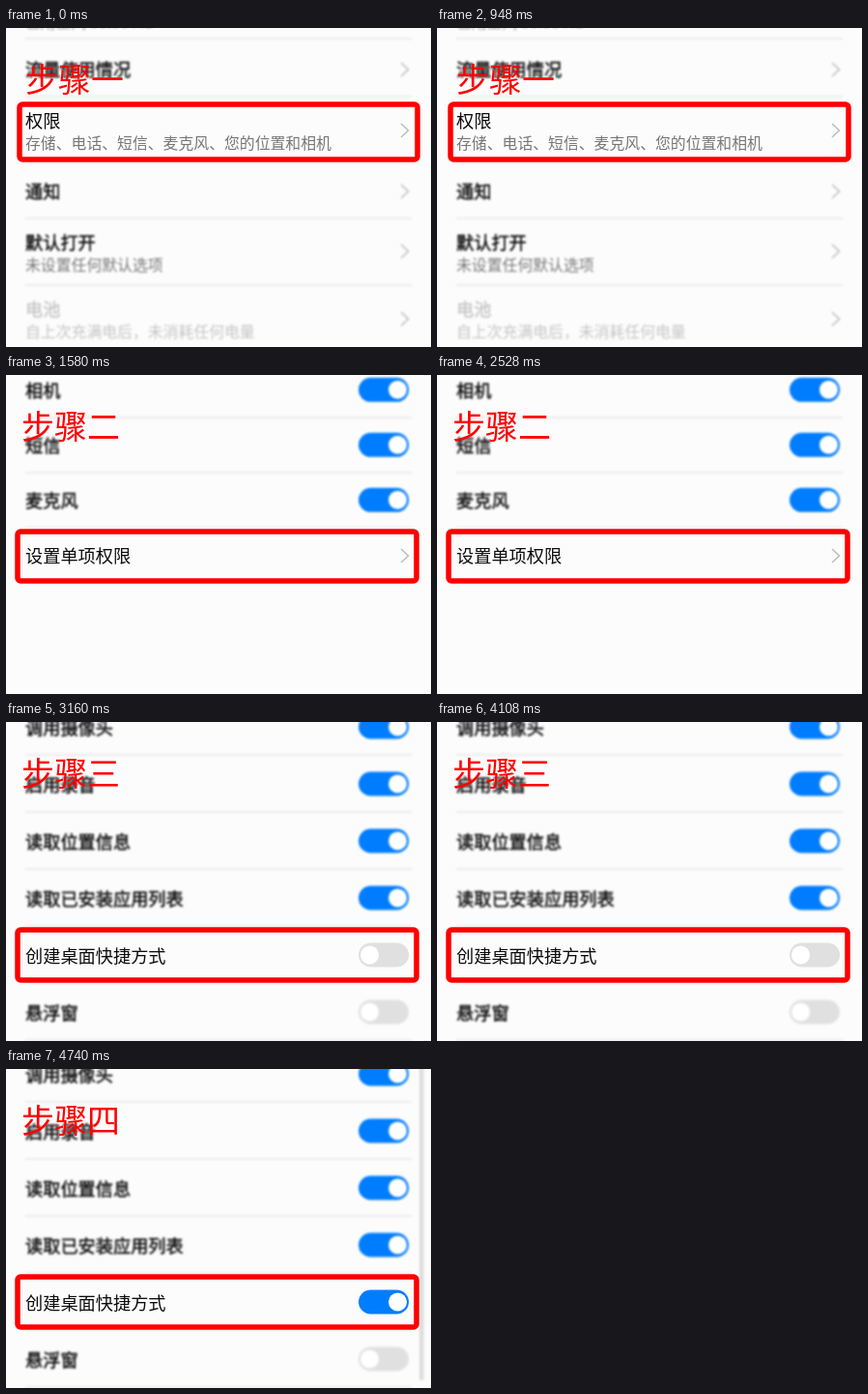
Write an HTML page that moves like this. It is 440 px wide and 330 px high and loops after 6320 ms.

```html
<!DOCTYPE html>
<html lang="zh-CN">
<head>
<meta charset="utf-8">
<title>权限设置步骤</title>
<style>
html, body { margin: 0; width: 100%; height: 100%; overflow: hidden; background: #fcfcfc; }
svg { display: block; width: 440px; height: 330px; }
text { font-family: "Noto Sans CJK SC", "Noto Sans CJK", "Noto Sans SC", sans-serif; }
.soft { filter: url(#blur); }
.soft .label { stroke: currentColor; stroke-width: .45; }
</style>
</head>
<body>
<svg id="stage" viewBox="0 0 440 330" lang="zh-CN">
  <defs>
    <filter id="blur" filterUnits="userSpaceOnUse" x="-20" y="-40" width="480" height="410" color-interpolation-filters="sRGB">
      <feGaussianBlur stdDeviation="0.9"/>
    </filter>
  </defs>
</svg>
<script>
const STEP = 1580;
const LABEL = 18.2, NOTE = 15.85, TITLE = 34;
const INK = '#0c0c0c', GREY = '#777', PALE = '#c4c4c4';
const stage = document.getElementById('stage');

function add(parent, tag, attrs, content) {
  const el = document.createElementNS('http://www.w3.org/2000/svg', tag);
  for (const key in attrs) el.setAttribute(key, attrs[key]);
  if (content) el.textContent = content;
  parent.appendChild(el);
  return el;
}

// Places text by the vertical middle of its glyphs.
function write(parent, content, x, mid, size, color, kind = '') {
  add(parent, 'text', {
    x, y: mid + size * 0.38, 'font-size': size, fill: color, color, class: kind
  }, content);
}

const label = (g, s, y, color = INK) => write(g, s, 20, y, LABEL, color, 'label');
const note = (g, s, y, color = GREY) => write(g, s, 20, y, NOTE, color);

function rule(g, y) {
  add(g, 'rect', { x: 20, y: y - 0.5, width: 400, height: 1, fill: '#dedede' });
}

function chevron(g, y) {
  add(g, 'path', {
    d: `M409 ${y - 7}l7.5 7l-7.5 7`, fill: 'none', stroke: '#bdbdbd', 'stroke-width': 1.5
  });
}

function toggle(g, y, on) {
  add(g, 'rect', {
    x: 365, y: y - 12.5, width: 52, height: 25, rx: 12.5, fill: on ? '#007dff' : '#e0e0e0'
  });
  add(g, 'circle', { cx: on ? 405.5 : 376.5, cy: y, r: 9.5, fill: '#fff' });
}

function scene(title, titleX, box, draw) {
  const g = add(stage, 'g', { visibility: 'hidden' });
  const soft = add(g, 'g', { class: 'soft' });
  const sharp = add(g, 'g', {});
  draw(soft, sharp);
  const [x, y, width, height] = box;
  add(g, 'rect', {
    x, y, width, height, rx: 3, fill: 'none', stroke: '#f00', 'stroke-width': 5.5
  });
  write(g, title, titleX, 53, TITLE, '#f00');
  return g;
}

function appInfo(soft, sharp) {
  note(soft, '已用空间 38.56 MB', -6, '#999');
  [11, 71, 197, 266].forEach(y => rule(soft, y));
  label(soft, '流量使用情况', 43);
  label(soft, '通知', 169);
  label(soft, '默认打开', 222);
  note(soft, '未设置任何默认选项', 245);
  label(soft, '电池', 291, PALE);
  note(soft, '自上次充满电后，未消耗任何电量', 314, PALE);
  [43, 169, 231, 301].forEach(y => chevron(soft, y));
  label(sharp, '权限', 96);
  note(sharp, '存储、电话、短信、麦克风、您的位置和相机', 119);
  chevron(sharp, 106);
}

function permissions(soft, sharp) {
  ['相机', '短信', '麦克风'].forEach((name, i) => {
    const y = 16 + 57 * i;
    label(soft, name, y);
    toggle(soft, y - 0.7, true);
    rule(soft, y + 28);
  });
  label(sharp, '设置单项权限', 187);
  chevron(sharp, 187);
}

const singles = granted => (soft, sharp) => {
  const names = ['调用摄像头', '启用录音', '读取位置信息', '读取已安装应用列表', '创建桌面快捷方式', '悬浮窗'];
  names.forEach((name, i) => {
    const y = 6 + 59 * i;
    const layer = i === 4 ? sharp : soft;
    label(layer, name, y);
    toggle(layer, y - 1, i < 4 || (i === 4 && granted));
    rule(soft, y + 28);
  });
  if (granted) {
    add(soft, 'rect', { x: 428, y: -10, width: 4.5, height: 332, rx: 2, fill: '#dcdcdc' });
  }
};

const listBox = [12, 215, 413, 52];
const scenes = [
  scene('步骤一', 20, [14, 79, 412, 57], appInfo),
  scene('步骤二', 16, [12, 162, 413, 51], permissions),
  scene('步骤三', 16, listBox, singles(false)),
  scene('步骤四', 16, listBox, singles(true))
];

function render(time) {
  const current = Math.floor(time / STEP) % scenes.length;
  scenes.forEach((g, i) => g.setAttribute('visibility', i === current ? 'visible' : 'hidden'));
}

let start;
function tick(now) {
  start ??= now;
  render(now - start);
  requestAnimationFrame(tick);
}
render(0);
requestAnimationFrame(tick);
</script>
</body>
</html>
```
